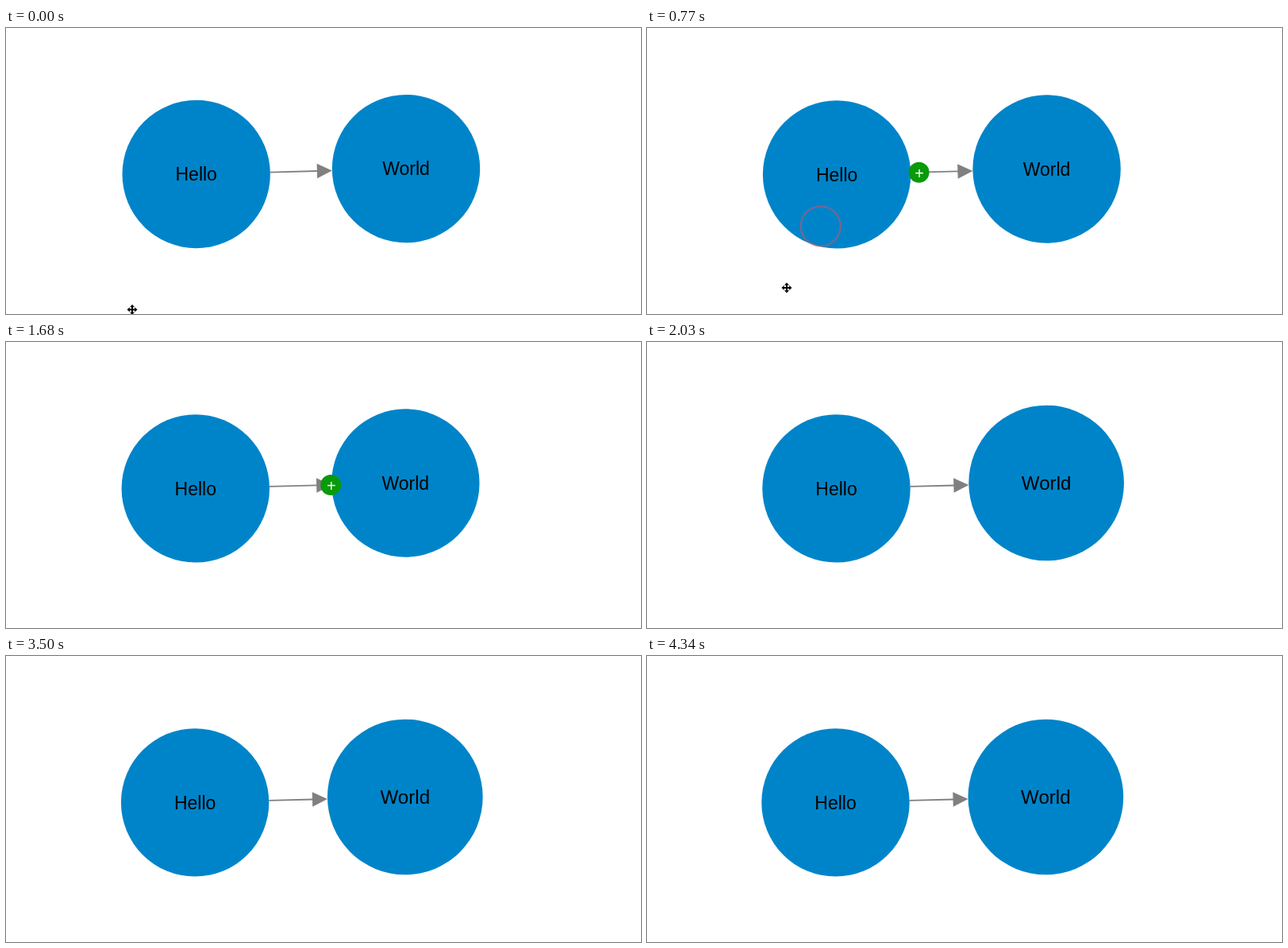
An HTML page for the animation above (4410 ms loop, 800 by 360 pixels).

```html
<!DOCTYPE html>
<html lang="en">
<head>
<meta charset="utf-8">
<title>Hello World graph</title>
<style>
  html, body { margin: 0; width: 100%; height: 100%; overflow: hidden; background: #fff; }
  svg { display: block; width: 800px; height: 360px; }
  text { font-family: "Liberation Sans", Arial, Helvetica, sans-serif; text-anchor: middle; }
  .node circle { fill: #0084c9; }
  .node text { font-size: 23px; }
  #badge circle { fill: #099a09; }
  #badge text { font-size: 20px; fill: #fff; }
  #ring { fill: none; stroke: #e64b5f; stroke-width: 2.2; }
</style>
</head>
<body>
<svg viewBox="0 0 800 360">
  <g id="edge" fill="#808080">
    <path id="line" stroke="#808080" stroke-width="1.8"/>
    <path id="head" d="M0 0L-19 -9.3V9.3Z"/>
  </g>
  <g id="hello" class="node"><circle r="93.2"/><text y="8.3">Hello</text></g>
  <g id="world" class="node"><circle r="93.2"/><text y="8.3">World</text></g>
  <g id="badge"><circle r="13"/><text x=".5" y="8">+</text></g>
  <circle id="ring" cx="218.8" cy="249.5"/>
  <path id="cursor" fill="#000" stroke="#fff" stroke-width="1.6" paint-order="stroke"
    d="M0 -6.5L3 -3.2H1V-1H3.2V-3L6.5 0L3.2 3V1H1V3.2H3L0 6.5L-3 3.2H-1V1H-3.2V3L-6.5 0L-3.2 -3V-1H-1V-3.2H-3Z"/>
</svg>
<script>
const LOOP = 4410, STEP = 70, R = 93.2;
const el = Object.fromEntries([...document.querySelectorAll('[id]')].map(e => [e.id, e]));
const clamp = v => Math.min(1, Math.max(0, v));
const progress = (t, from, to) => clamp((t - from) / (to - from));
const ease = p => p * p * (3 - 2 * p);
const move = (e, x, y, extra = '') => e.setAttribute('transform', `translate(${x} ${y}) ${extra}`);
const show = (e, on) => e.setAttribute('display', on ? 'inline' : 'none');

// Linear interpolation through [time, value] stops
function along(t, stops) {
  let v = stops[0][1];
  for (let i = 1; i < stops.length; i++) {
    const [t0] = stops[i - 1], [t1, v1] = stops[i];
    v += (v1 - stops[i - 1][1]) * progress(t, t0, t1);
  }
  return v;
}

function draw(t) {
  // The layout settles slowly to the left
  const drift = along(t, [[0, 0], [1190, .9], [1680, .9], [2590, 1.6], [3500, 1.6], [4340, 2.2]]);
  const sink = .4 * progress(t, 0, 770);
  const hx = 239.7 - drift, hy = 184 + sink;
  const wx = 504 - drift * .75, wy = 177.1 + sink;
  const scale = 1 + .05 * ease(progress(t, 1700, 2050));
  move(el.hello, hx, hy);
  move(el.world, wx, wy, `scale(${scale})`);

  const dx = wx - hx, dy = wy - hy, len = Math.hypot(dx, dy);
  const tip = len - R * scale;
  move(el.edge, hx, hy, `rotate(${Math.atan2(dy, dx) * 180 / Math.PI})`);
  el.line.setAttribute('d', `M${R} 0H${tip - 18}`);
  move(el.head, tip, 0);

  // The badge travels along the edge at constant speed
  show(el.badge, t >= 630 && t < 1750);
  const s = (R + (t - 630) * .0736) / len;
  move(el.badge, hx + dx * s, hy + dy * s);

  const click = progress(t, 490, 840);
  show(el.ring, click > 0 && click < 1);
  el.ring.setAttribute('r', 8 + 17 * clamp(click * 1.25));
  el.ring.setAttribute('opacity', along(click, [[0, .9], [.8, .52], [1, 0]]));

  // The pointer goes up to the click, then backs off and vanishes
  show(el.cursor, t < 840);
  move(el.cursor,
    along(t, [[0, 159], [420, 219], [630, 219], [770, 176]]),
    along(t, [[0, 354.5], [420, 250], [630, 250], [770, 327]]));
}

const start = performance.now();
function tick() {
  const t = (performance.now() - start) % LOOP;
  draw(Math.floor(t / STEP) * STEP);
  requestAnimationFrame(tick);
}
tick();
</script>
</body>
</html>
```
